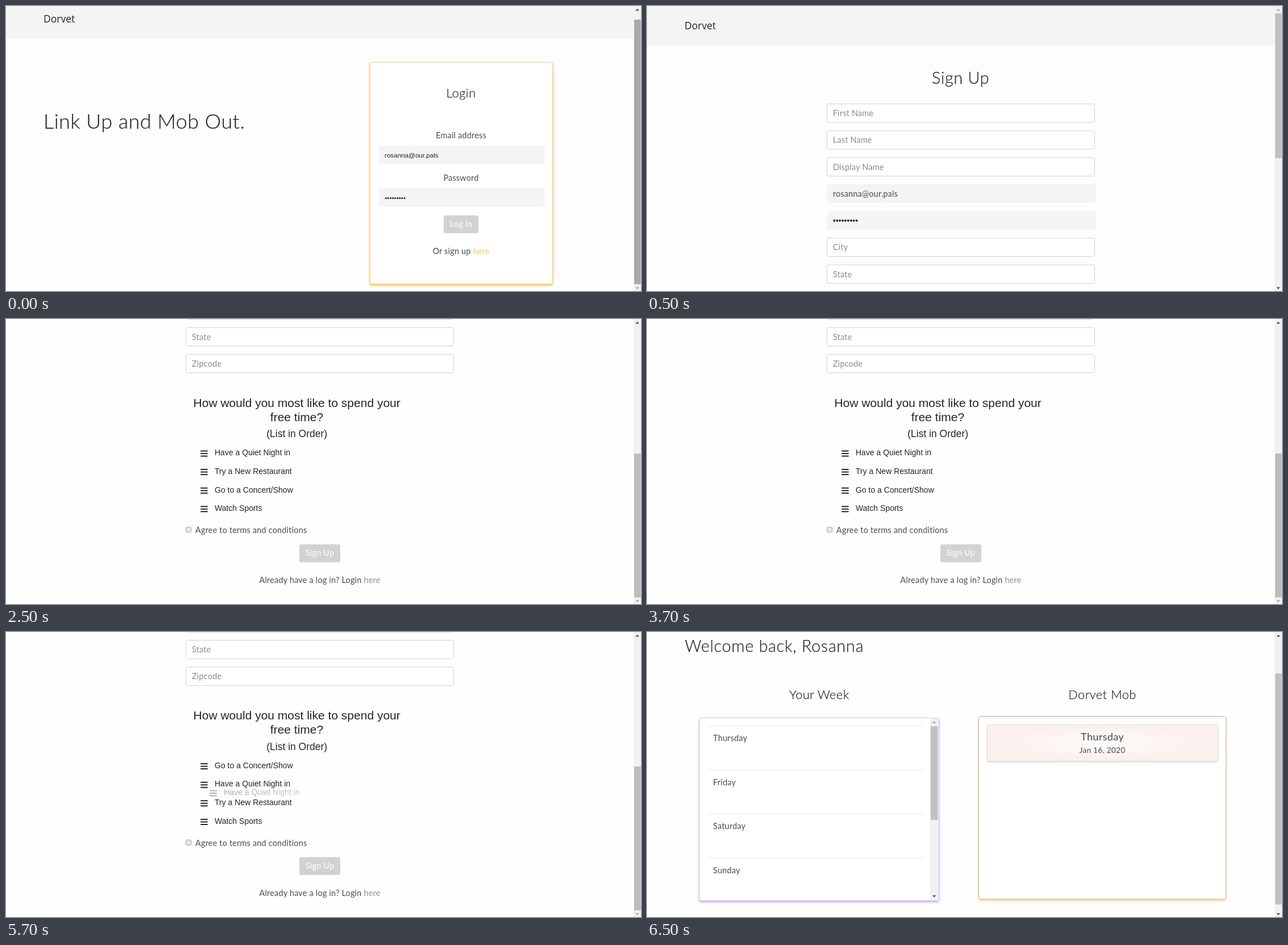
Animation of 1117x502 px, one loop 8 s. Source, as an HTML page:

```html
<!DOCTYPE html>
<html lang="en">
<head>
<meta charset="utf-8">
<title>Sign-up walkthrough</title>
<style>
  html, body { margin: 0; width: 100%; height: 100%; overflow: hidden; background: #fdfdfd; }
  svg { display: block; width: 1117px; height: 502px; }
  text { font: 14.4px Lato, sans-serif; letter-spacing: .015em; fill: #484c50; white-space: pre; }
  .brand { font: 17.5px "Open Sans", sans-serif; letter-spacing: 0; fill: #212529; }
  .hero, .title, .head { font-weight: 300; fill: #25292d; stroke: #25292d; stroke-width: .25px; }
  .hero { font-size: 36px; letter-spacing: .012em; }
  .title { font-size: 28.8px; letter-spacing: .024em; }
  .head { font-size: 21.6px; letter-spacing: .024em; }
  .day { font-size: 18px; letter-spacing: .02em; }
  .date { font-size: 13.8px; }
  .hint { fill: #858c93; }
  .white { fill: #fff; }
  .arial { font: 14px "Liberation Sans", Arial, sans-serif; letter-spacing: 0; fill: #212529; }
  .small { font-size: 11.65px; }
  .mid { font-size: 17.5px; }
  .big { font-size: 21px; }
  .gold { fill: #f8c76c; }
  .green { fill: #879779; }
  .input { fill: #fff; stroke: #ced3d8; }
  .login { fill: #fff; stroke: #f0d093; filter: drop-shadow(0 2px 2.3px #f6b63c); }
  .week { fill: #fff; stroke: #e0d0f0; filter: drop-shadow(0 2px 2.3px #c193ee); }
  .mob { fill: #fff; stroke: #b5b3ae; filter: drop-shadow(0 3px 2.3px #f5dc9c); }
  .event { fill: url(#blush); stroke: #e9dfdc; filter: drop-shadow(0 1px 1px #d5cdca); }
</style>
</head>
<body>
<svg id="stage" viewBox="0 0 1117 502" xmlns="http://www.w3.org/2000/svg"></svg>
<script>
const BRAND = 'Dorvet', NAME = 'Rosanna', EMAIL = 'rosanna@our.pals';
const DOTS = '•'.repeat(9);

const rect = (x, y, w, h, fill, r = 0) =>
  `<rect x="${x}" y="${y}" width="${w}" height="${h}" rx="${r}" fill="${fill}"/>`;
const box = (x, y, w, h, cls, r = 3) =>
  `<rect x="${x}" y="${y}" width="${w}" height="${h}" rx="${r}" class="${cls}"/>`;
const text = (x, y, str, cls = '', anchor = 'start') =>
  `<text x="${x}" y="${y}" class="${cls}" text-anchor="${anchor}">${str}</text>`;
const mid = (x, y, str, cls) => text(x, y, str, cls, 'middle');
const link = (str, cls) => `<tspan class="${cls}">${str}</tspan>`;

// Arrowhead; dir is -1 for up, 1 for down
const arrow = (x, y, dir, on) =>
  `<path d="M${x - 3.3} ${y - 1.7 * dir}h6.6l-3.3 ${3.6 * dir}z" fill="${on ? '#505050' : '#a9a9a9'}"/>`;

function scrollbar(top, bottom, color, up, down) {
  return rect(1104, 0, 13, 502, '#f1f1f1') + rect(1105, top, 11.5, bottom - top, color) +
    arrow(1110.5, 6.5, -1, up) + arrow(1110.5, 497, 1, down);
}

const header = h => rect(0, 0, 1104, h, '#f4f4f4') + text(66, h - 28.5, BRAND, 'brand');

const input = (y, label) =>
  box(316.5, y, 471, 32.5, 'input') + text(327, y + 21.5, label, 'hint');

const filled = (y, label, cls) =>
  rect(317, y, 472, 33, '#f4f4f4', 3) + text(327, y + 21.5, label, cls);

const button = (x, y, w, label) =>
  rect(x, y, w, 31.5, '#d2d2d2', 3) + mid(x + w / 2, y + 20.3, label, 'white');

const bars = (x, y, color) =>
  [0, 4.5, 9].map(d => rect(x, y + d, 12.5, 2, color, .5)).join('');

const item = (label, i) => {
  const y = 240.3 + i * 32.6;
  return bars(342.3, y - 8.8, '#24282c') + text(367, y, label, 'arial');
};

function loginPage() {
  return rect(0, 0, 1117, 502, '#fdfdfd') + header(57) +
    text(66, 216, 'Link Up and Mob Out.', 'hero') +
    box(640.5, 99.5, 321, 390, 'login') +
    mid(800.5, 161.3, 'Login', 'head') +
    mid(800.5, 232.8, 'Email address') +
    rect(656, 246, 292, 32.5, '#f4f4f4', 3) + text(666, 267, EMAIL, 'arial small') +
    mid(800.5, 307.8, 'Password') +
    rect(656, 321, 292, 32.5, '#f4f4f4', 3) + text(666.3, 342, DOTS, 'arial small') +
    button(770, 368.7, 61, 'Log In') +
    mid(800.5, 437.3, 'Or sign up ' + link('here', 'gold')) +
    scrollbar(24, 490, '#a8a8a8', true, false);
}

function signUpTop() {
  const fields = ['First Name', 'Last Name', 'Display Name', null, null, 'City', 'State'];
  return rect(0, 0, 1117, 502, '#fdfdfd') + header(69) +
    mid(551.7, 137.3, 'Sign Up', 'title') +
    fields.map((f, i) => f ? input(172.5 + i * 47.25, f) : '').join('') +
    filled(314, EMAIL, '') + filled(361.5, DOTS, 'arial') +
    scrollbar(13, 268, '#c1c1c1', false, true);
}

function signUpEnd(list, shift, extra = '') {
  return rect(0, 0, 1117, 502, '#fefefe') + `<g transform="translate(0 ${shift})">` +
    input(-32, '') + input(15, 'State') + input(62.3, 'Zipcode') +
    mid(511.7, 154.6, 'How would you most like to spend your', 'arial big') +
    mid(511.5, 179.8, 'free time?', 'arial big') +
    mid(511.7, 208.3, '(List in Order)', 'arial mid') +
    list.map(item).join('') +
    '<rect x="316.7" y="366.7" width="9" height="9" rx="1.5" fill="#e6e6e6" stroke="#a6a6a6"/>' +
    text(333, 377.3, 'Agree to terms and conditions') +
    button(516, 397, 72, 'Sign Up') +
    mid(552, 465, 'Already have a log in? Login ' + link('here', 'green')) +
    '</g>' + extra + scrollbar(237, 490.5, '#bcbcbc', true, false);
}

function dragged() {
  return '<g opacity=".9">' + bars(358.5, 278.5, '#a3a3a3') +
    `<text x="383.5" y="287" class="arial" style="fill:url(#fade)">Have a Quiet Night in</text></g>`;
}

function dashboard() {
  const days = ['Thursday', 'Friday', 'Saturday', 'Sunday'];
  return rect(0, 0, 1117, 502, '#fefefe') +
    text(66.5, 35.3, 'Welcome back, ' + NAME, 'title') +
    mid(303, 118.2, 'Your Week', 'head') + mid(801, 118.2, BRAND + ' Mob', 'head') +
    box(92.5, 151.5, 420.5, 321.5, 'week', 2) +
    days.map((d, i) => {
      const y = 165 + i * 77.5;
      return rect(107, y, 379, 1, '#e8e9ea') + text(116.3, y + 27, d);
    }).join('') +
    rect(498, 152, 14, 320.5, '#f1f1f1') + rect(499, 166, 12.5, 165, '#c1c1c1') +
    arrow(505.2, 159, -1, false) + arrow(505.2, 465.5, 1, true) +
    box(583.5, 148.5, 435, 322, 'mob', 4) +
    box(598.5, 163.5, 405.5, 64, 'event', 2) +
    mid(801, 190.8, 'Thursday', 'day') + mid(801, 213.3, 'Jan 16, 2020', 'date') +
    scrollbar(73, 480, '#c1c1c1', true, true);
}

const QUIET = 'Have a Quiet Night in', FOOD = 'Try a New Restaurant';
const SHOW = 'Go to a Concert/Show', SPORT = 'Watch Sports';

const steps = [
  [0, loginPage()],
  [500, signUpTop()],
  [2500, signUpEnd([QUIET, FOOD, SHOW, SPORT], 0)],
  [4500, signUpEnd([SHOW, QUIET, FOOD, SPORT], -.4, dragged())],
  [6500, dashboard()]
];
const LOOP = 8000;

const stage = document.getElementById('stage');
stage.innerHTML = `<defs>
  <radialGradient id="blush"><stop offset="0" stop-color="#fefbfa"/><stop offset="1" stop-color="#faf0ed"/></radialGradient>
  <linearGradient id="fade"><stop offset="0" stop-color="#a0a0a0"/><stop offset="1" stop-color="#c6c6c6"/></linearGradient>
</defs>` + steps.map(s => `<g class="scene" visibility="hidden">${s[1]}</g>`).join('');
const scenes = [...stage.querySelectorAll('.scene')];

const start = performance.now();
let shown = -1;
function draw(now) {
  const t = Math.max(0, now - start) % LOOP;
  const next = steps.filter(s => s[0] <= t).length - 1;
  if (next !== shown) {
    scenes.forEach((s, i) => s.setAttribute('visibility', i === next ? 'visible' : 'hidden'));
    shown = next;
  }
  requestAnimationFrame(draw);
}
draw(start);
</script>
</body>
</html>
```
